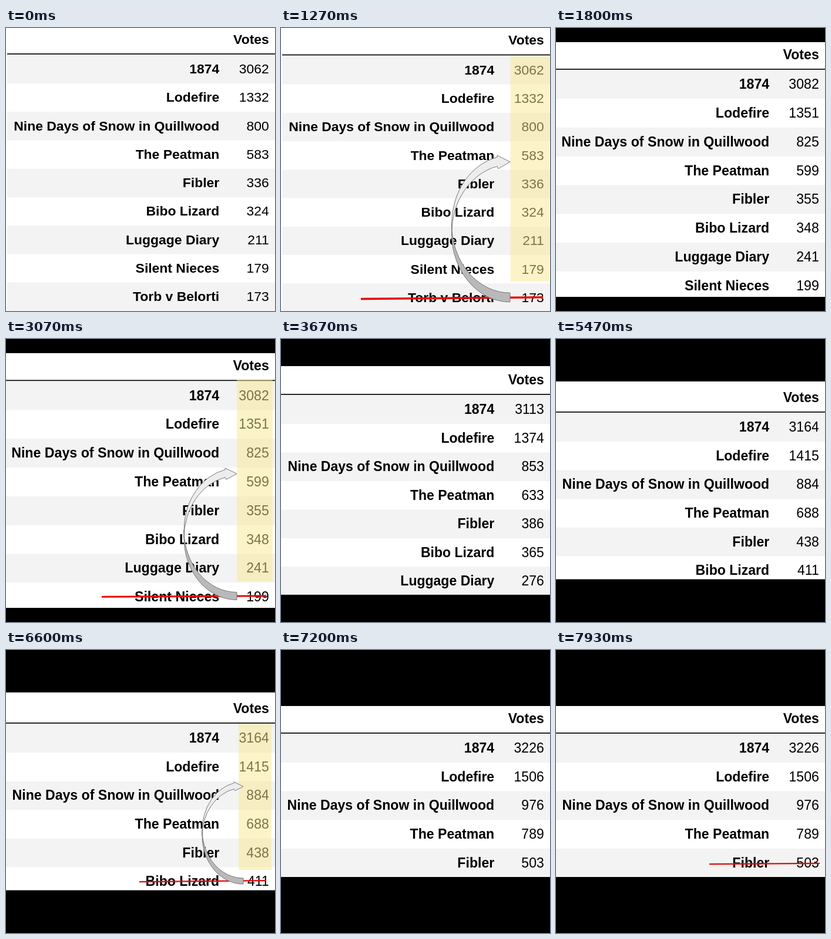
An HTML page with a canvas that plays this animation: 458x480 px, repeating every 8000 ms.

```html
<!DOCTYPE html>
<html lang="en">
<head>
<meta charset="utf-8">
<title>Vote rounds</title>
<style>
  html, body { margin: 0; width: 100%; height: 100%; overflow: hidden; background: #000; }
  canvas { display: block; }
</style>
</head>
<body>
<canvas id="stage" width="458" height="480"></canvas>
<script>
const ctx = document.getElementById('stage').getContext('2d');
const LOOP = 8000, WIDTH = 458;
const titles = ['1874', 'Lodefire', 'Nine Days of Snow in Quillwood', 'The Peatman', 'Fibler',
  'Bibo Lizard', 'Luggage Diary', 'Silent Nieces', 'Torb v Belorti'];

// Per round: start, strike and transfer times, table layout, then the marks drawn over it.
// arrow: right edge, tip y, tail y, horizontal radius, band thickness, head length
const rounds = [
  { start: 0, strikeAt: 600, moveAt: 1200, top: 0, bottom: 480, rule: 43.3, pitch: 48.25, left: 2, nudge: 1.6,
    votes: [3062, 1332, 800, 583, 336, 324, 211, 179, 173],
    strike: [136, 459.5, 446, 456.7, 3.4], band: [390.5, 48, 457, 430], arrow: [390, 227, 457, 99.5, 15.5, 22] },
  { start: 1800, strikeAt: 2400, moveAt: 2930, top: 24, bottom: 456, rule: 69.2, pitch: 48.8, left: 0, nudge: 0.4,
    votes: [3082, 1351, 825, 599, 355, 348, 241, 199],
    strike: [163, 437.2, 443, 435.7, 3], band: [393, 69, 454, 411], arrow: [393, 228.5, 436, 90, 13, 20] },
  { start: 3600, strikeAt: 4200, moveAt: 4800, top: 46, bottom: 433.5, rule: 93.2, pitch: 48.5, left: 0, nudge: 0,
    votes: [3113, 1374, 853, 633, 386, 365, 276],
    strike: [195, 410, 446, 408.5, 2.8], band: [391, 102, 455, 386], arrow: [401, 222.5, 408, 81, 12, 18] },
  { start: 5270, strikeAt: 6000, moveAt: 6600, top: 72, bottom: 407.5, rule: 123.2, pitch: 48.6, left: 0, nudge: 0,
    votes: [3164, 1415, 884, 688, 438, 411],
    strike: [227, 393.2, 442, 391.2, 2.2], band: [396, 125, 452, 373], arrow: [404, 231.5, 392, 70, 10, 16] },
  { start: 7070, strikeAt: 7800, moveAt: Infinity, top: 95, bottom: 385, rule: 140.2, pitch: 48.6, left: 0, nudge: 0,
    votes: [3226, 1506, 976, 789, 503],
    strike: [261, 363.2, 449, 361.8, 2.2] }
];

function box(color, x0, y0, x1, y1) {
  ctx.fillStyle = color;
  ctx.fillRect(x0, y0, x1 - x0, y1 - y0);
}

function label(text, x, middle, size, weight) {
  ctx.font = `${weight} ${size}px "Liberation Sans", Arial, sans-serif`;
  ctx.fillStyle = '#000';
  ctx.textAlign = 'right';
  ctx.fillText(text, x, middle + 7.4);
}

function drawTable({ top, bottom, rule, pitch, left, votes }) {
  const size = pitch * 0.475;
  box('#fff', 0, top, WIDTH, bottom);
  votes.forEach((count, i) => {
    const middle = rule + 26.5 + i * pitch;
    if (i % 2 === 0) {
      box('#f3f3f3', left, middle - pitch / 2, WIDTH, Math.min(bottom, middle + pitch / 2));
    }
    label(titles[i], 363.2, middle, size, 'bold');
    label(count, 447.8, middle, size, 'normal');
  });
  box('#111', left, rule - 0.2, WIDTH, rule + 1.6);
  label('Votes', 447.8, rule - 24.1, size, 'bold');
}

function drawStrike([x0, y0, x1, y1, weight]) {
  ctx.strokeStyle = '#e80808';
  ctx.lineWidth = weight;
  ctx.beginPath();
  ctx.moveTo(x0, y0);
  ctx.lineTo(x1, y1);
  ctx.stroke();
}

function paint(color) {
  ctx.closePath();
  ctx.fillStyle = color;
  ctx.fill();
  ctx.strokeStyle = '#777';
  ctx.lineWidth = 1;
  ctx.stroke();
}

// Two equal ellipses, one band thickness apart, bound the tail and the head.
function drawArrow([right, tip, tail, rx, thick, head]) {
  const { PI } = Math;
  const ry = (tail - tip + 3) / 2, center = tail - ry;
  const high = center - thick / 2, low = center + thick / 2;
  const neck = PI + Math.acos(head / rx);
  const neckY = center + ry * Math.sin(neck), reach = thick * 0.7;

  ctx.beginPath();
  ctx.ellipse(right, low, rx, ry, 0, PI / 2, PI);
  ctx.ellipse(right, high, rx, ry, 0, PI, PI / 2, true);
  paint('#b9b9b9');

  ctx.beginPath();
  ctx.ellipse(right, high, rx, ry, 0, PI, neck);
  ctx.lineTo(right - head, neckY - reach);
  ctx.lineTo(right, tip);
  ctx.lineTo(right - head + 2, neckY + reach + 1);
  ctx.ellipse(right, low, rx, ry, 0, neck, PI, true);
  paint('#ededed');
}

function draw(time) {
  const round = rounds.findLast(r => time >= r.start);
  const struck = time >= round.strikeAt;
  box('#000', 0, 0, WIDTH, 480);
  drawTable(struck ? { ...round, rule: round.rule + round.nudge } : round);
  if (struck) drawStrike(round.strike);
  if (time >= round.moveAt) {
    box('rgba(251, 231, 148, 0.5)', ...round.band);
    drawArrow(round.arrow);
  }
}

const began = performance.now();
function tick() {
  draw((performance.now() - began) % LOOP);
  requestAnimationFrame(tick);
}
tick();
</script>
</body>
</html>
```
